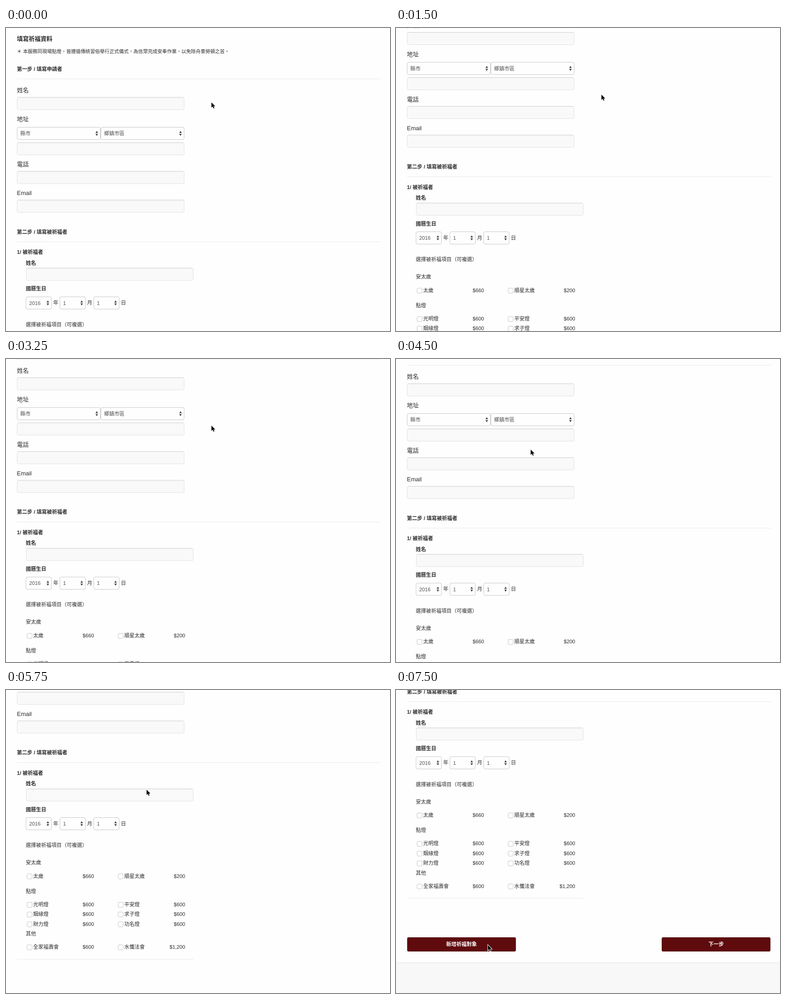
Write an HTML page with a canvas that moves like this. It is 844 by 664 pixels and loops after 8 s.

```html
<!DOCTYPE html>
<html lang="zh-Hant">
<head>
<meta charset="utf-8">
<style>
html, body { margin: 0; width: 100%; height: 100%; overflow: hidden; background: #fefefe; }
canvas { display: block; }
</style>
</head>
<body>
<canvas id="stage" width="844" height="664"></canvas>
<script>
const ctx = document.getElementById('stage').getContext('2d');
const FONT = '"Liberation Sans", "Noto Sans CJK TC", "Noto Sans CJK", sans-serif';
const LOOP = 8000, STEP = 250, SMALL = 11.25;

// Scroll gestures: start, end, from, to, easing power
const scrolls = [
  [750, 1500, 0, 142.5, 3],
  [1750, 2500, 142.5, 286, 3],
  [2750, 4000, 286, 98, 5.2],
  [5000, 5750, 98, 309.5, 3],
  [5750, 6500, 309.5, 443, 3]
];

// Pointer path: time, x, y
const pointer = [
  [250, 451.5, 163], [750, 451.5, 146], [4000, 451.5, 146], [4250, 396, 148],
  [4500, 296, 198.5], [5000, 309, 218.5], [6000, 309, 218.5],
  [6500, 199, 613], [7000, 202, 559]
];

function scrollAt(t) {
  let y = 0;
  for (const [start, end, from, to, power] of scrolls) {
    if (t <= start) break;
    const p = Math.min(1, (t - start) / (end - start));
    y = from + (to - from) * (1 - Math.pow(1 - p, power));
  }
  return y;
}

function pointerAt(t) {
  let prev = pointer[0];
  for (const key of pointer) {
    if (t < key[0]) {
      const p = Math.max(0, (t - prev[0]) / (key[0] - prev[0]));
      return [prev[1] + (key[1] - prev[1]) * p, prev[2] + (key[2] - prev[2]) * p];
    }
    prev = key;
  }
  return [prev[1], prev[2]];
}

function text(str, x, cy, { size = SMALL, bold = false, color = '#2b2b2b', align = 'left' } = {}) {
  ctx.font = `${bold ? 'bold ' : ''}${size}px ${FONT}`;
  ctx.fillStyle = color;
  ctx.textAlign = align;
  ctx.fillText(str, x, cy + size * 0.37);
}

function box(x, y, w, h, r, fill, stroke) {
  ctx.beginPath();
  ctx.roundRect(x + 0.5, y + 0.5, w - 1, h - 1, r);
  ctx.fillStyle = fill;
  ctx.fill();
  ctx.lineWidth = 1;
  ctx.strokeStyle = stroke;
  ctx.stroke();
}

function rule(y, right = 824) {
  ctx.fillStyle = '#e9e9e9';
  ctx.fillRect(24, y, right - 24, 1);
}

function field(x, y) {
  box(x, y, 368, 28, 3, '#f9f9f9', '#e0e0e0');
  ctx.fillStyle = '#d6d6d6';
  ctx.fillRect(x + 2, y, 364, 1);
  ctx.fillStyle = '#eeeeee';
  ctx.fillRect(x + 1, y + 1, 366, 1);
}

function triangle(x, y, h) {
  ctx.beginPath();
  ctx.moveTo(x - 2.8, y);
  ctx.lineTo(x + 2.8, y);
  ctx.lineTo(x, y + h);
  ctx.fill();
}

function select(label, x, y, w) {
  box(x, y, w, 28, 3.5, '#fefefe', '#c6c6c6');
  text(label, x + 7.5, y + 14, { color: '#505050' });
  ctx.fillStyle = '#444';
  triangle(x + w - 8.5, y + 13, -4.5);
  triangle(x + w - 8.5, y + 15, 4.5);
}

function option(label, price, x, cy) {
  box(x, cy - 5, 12, 12, 2.5, '#fefefe', '#c4c4c4');
  text(label, x + 14, cy);
  text(price, x + 147.8, cy, { align: 'right' });
}

function button(label, x) {
  box(x, 985, 239, 31, 2, '#5f0a0d', '#4c080a');
  text(label, x + 119.5, 1000, { bold: true, color: '#fff', align: 'center' });
}

function applicant() {
  const label = { size: 13 };
  text('填寫祈福資料', 24, 23, { size: 13, bold: true });
  text('＊ 本服務同現場點燈，皆遵循傳統習俗舉行正式儀式，為信眾完成安奉作業，以免除舟車勞頓之苦。', 24, 51.5, { size: 10.55 });
  text('第一步 / 填寫申請者', 24, 89.5, { bold: true });
  rule(111);
  text('姓名', 24, 136.5, label);
  field(24, 151.5);
  text('地址', 24, 199.5, label);
  select('縣市', 24, 217, 184);
  select('鄉鎮市區', 208, 217, 184);
  field(24, 250.5);
  text('電話', 24, 298.5, label);
  field(24, 313.5);
  text('Email', 24, 361.5, label);
  field(24, 376.5);
}

function recipient() {
  const bold = { bold: true };
  text('第二步 / 填寫被祈福者', 24, 446.5, bold);
  rule(468);
  text('1/ 被祈福者', 24, 491, bold);
  text('姓名', 43.5, 514.5, bold);
  field(44, 525.5);
  text('國曆生日', 43.5, 571, bold);
  [['2016', '年'], ['1', '月'], ['1', '日']].forEach(([value, unit], i) => {
    const x = 43.5 + i * 74.4;
    select(value, x, 588.5, 57);
    text(unit, x + 60.3, 602);
  });
  text('選擇被祈福項目（可複選）', 43.5, 649.5);
  text('安太歲', 43.5, 687.5);
  text('點燈', 43.5, 750);
  text('其他', 43.5, 843.5);
  const rows = [
    [717, '太歲', '$660', '順星太歲', '$200'],
    [779.3, '光明燈', '$600', '平安燈', '$600'],
    [800.5, '姻緣燈', '$600', '求子燈', '$600'],
    [822, '財力燈', '$600', '功名燈', '$600'],
    [872.5, '全家福壽會', '$600', '水懺法會', '$1,200']
  ];
  for (const [cy, left, leftPrice, right, rightPrice] of rows) {
    option(left, leftPrice, 45.8, cy);
    option(right, rightPrice, 246, cy);
  }
  rule(899, 412);
}

function footer() {
  button('新增祈福對象', 24.5);
  button('下一步', 584);
  ctx.fillStyle = '#f8f8f8';
  ctx.fillRect(0, 1041, 844, 100);
  ctx.fillStyle = '#e4e4e4';
  ctx.fillRect(0, 1040, 844, 1);
}

const arrow = new Path2D('M0 0V11.6L2.7 9.1L4.6 13.3L6.5 12.5L4.7 8.4H8.4Z');

function drawPointer(x, y) {
  ctx.save();
  ctx.translate(x, y);
  ctx.lineWidth = 1.8;
  ctx.strokeStyle = '#fff';
  ctx.stroke(arrow);
  ctx.fillStyle = '#000';
  ctx.fill(arrow);
  ctx.restore();
}

function draw(now) {
  const t = Math.floor((now % LOOP) / STEP) * STEP;
  ctx.fillStyle = '#fefefe';
  ctx.fillRect(0, 0, 844, 664);
  ctx.save();
  ctx.translate(0, -scrollAt(t));
  applicant();
  recipient();
  footer();
  ctx.restore();
  drawPointer(...pointerAt(t));
}

const begin = performance.now();
function tick() {
  draw(performance.now() - begin);
  requestAnimationFrame(tick);
}
tick();
</script>
</body>
</html>
```
